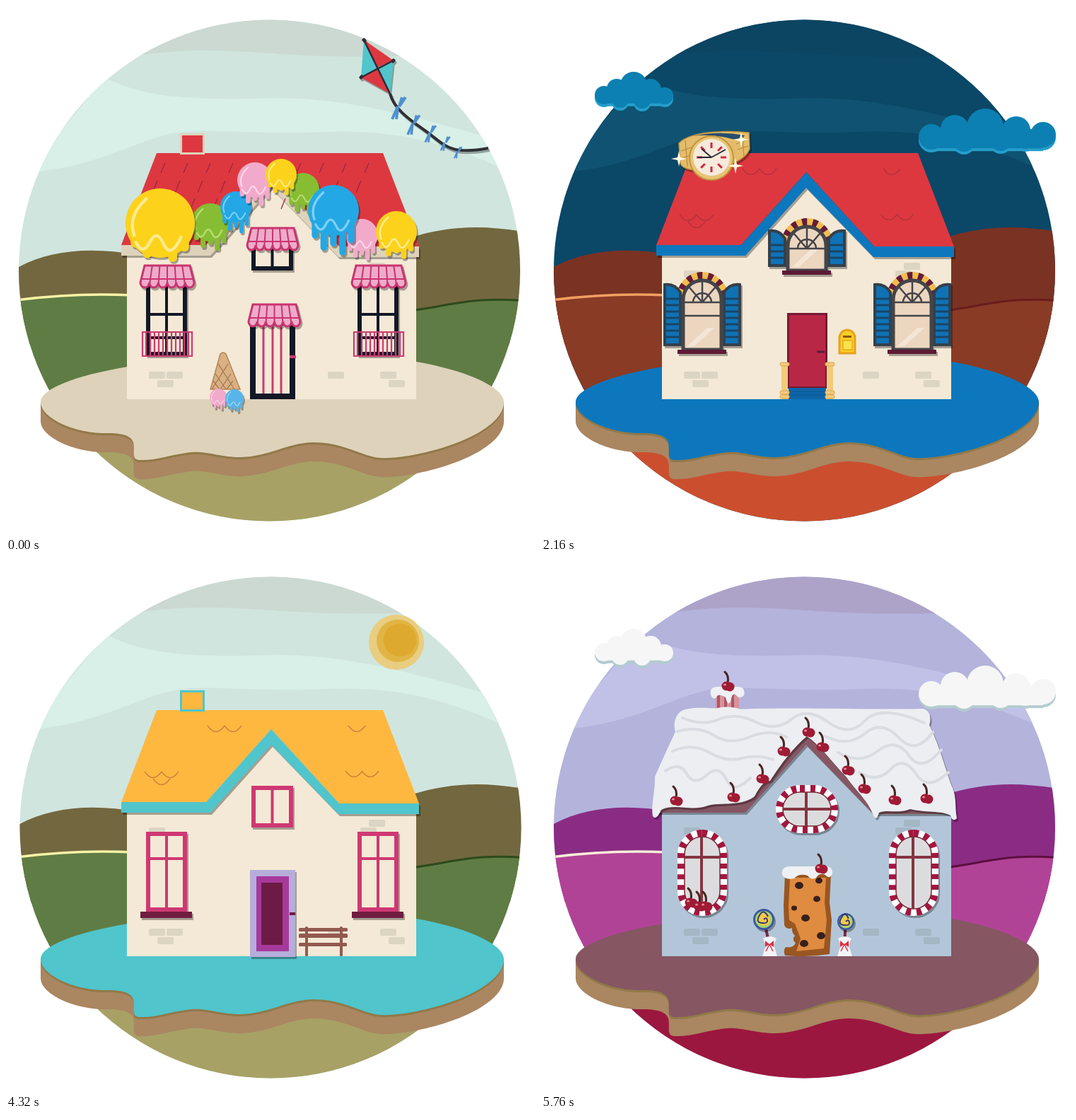
Recreate the animation shown at these times as an HTML page. Size 748 by 748 pixels, loop 6 s.

```html
<!DOCTYPE html>
<html lang="en">
<head>
<meta charset="utf-8">
<title>Little houses</title>
<style>
html,body{margin:0;width:100%;height:100%;overflow:hidden;background:#fff}
svg{display:block;width:100%;height:100%}
.s{filter:drop-shadow(2px 3px 0 rgba(0,0,0,.32))}
</style>
</head>
<body>
<svg id="stage" viewBox="0 0 748 748">
<defs>
<clipPath id="disc"><circle cx="372.5" cy="374" r="354.5"/></clipPath>
<linearGradient id="rainbow" gradientTransform="rotate(9)">
<stop offset=".08" stop-color="#27307f"/><stop offset=".22" stop-color="#1f6fae"/><stop offset=".3" stop-color="#274a98"/><stop offset=".42" stop-color="#1c7a3f"/>
<stop offset=".52" stop-color="#4d9a3a"/><stop offset=".56" stop-color="#f6e52c"/><stop offset=".74" stop-color="#f8c42a"/><stop offset=".87" stop-color="#ee7a2e"/><stop offset="1" stop-color="#d8432f"/>
</linearGradient>
<radialGradient id="gold" cx=".4" cy=".3" r=".75"><stop offset="0" stop-color="#f3cf72"/><stop offset=".5" stop-color="#cf8f25"/><stop offset="1" stop-color="#875010"/></radialGradient>
<radialGradient id="pane" cx=".3" cy=".3" r=".9"><stop offset="0" stop-color="#e6e6e6"/><stop offset="1" stop-color="#bdbdbd"/></radialGradient>
</defs>
</svg>
<script>
const stage = document.getElementById('stage');
const SLOT = 240;

// drawing helpers
const rect = (x, y, w, h, f, a = '') => `<rect x="${x}" y="${y}" width="${w}" height="${h}" fill="${f}" ${a}/>`;
const disc = (x, y, r, f, a = '') => `<circle cx="${x}" cy="${y}" r="${r}" fill="${f}" ${a}/>`;
const oval = (x, y, rx, ry, f, a = '') => `<ellipse cx="${x}" cy="${y}" rx="${rx}" ry="${ry}" fill="${f}" ${a}/>`;
const path = (d, f, a = '') => `<path d="${d}" fill="${f}" ${a}/>`;
const line = (d, c, w = 2, a = '') => path(d, 'none', `stroke="${c}" stroke-width="${w}" ${a}`);
const move = (x, y, s) => `<g transform="translate(${x} ${y})">${s}</g>`;
const shade = s => `<g class="s">${s}</g>`;
const pair = s => s + move(299, 0, s);
const each = (list, f) => list.map(f).join('');
const count = (n, f) => each([...Array(n).keys()], f);
const round = 'stroke-linecap="round"';

const hue = {
  sand: '#ded2ba', cream: '#f4e9d6', red: '#dd3840', teal: '#50c5cc', mist: '#b9c8de', amber: '#feb840',
  blue: '#0d77bd', ink: '#222222', black: '#09090b', stone: '#b8c2c4', lemon: '#fcdc35', cocoa: '#3f1100',
  aqua: '#9bcccd', wine: '#9c1844', mauve: '#865663', ice: '#b3c6d9'
};
// base, top band, light band
const skies = {
  day: ['#d0e5de', '#ccd9d3', '#d8f0e7'], night: ['#0b4767', '#0b4562', '#105271'], grey: ['#9a9a9a', '#9a9a9a', '#9a9a9a'],
  lagoon: ['#4dc3cd', '#48b9c4', '#4dd3da'], rose: ['#e1a8b1', '#d29aa8', '#f2b4c0'], violet: ['#b4b3dc', '#ada3c9', '#c1c1e8']
};
// far hill, near hill, left rim, right rim, front
const lands = {
  moor: ['#73673f', '#5f7c44', '#f8f2a6', '#2d4a1c', '#a7a165'], clay: ['#7a3223', '#8a3b26', '#f0a060', '#6a1d1d', '#cb4f2e'],
  meadow: ['#4a7d5b', '#63a337', '#f8f3b0', '#8a7a35', '#88c442'], dune: ['#f98c47', '#fea168', '#f8f3a8', '#3a0a10', '#e07b48'],
  berry: ['#8a2c84', '#b14397', '#f8f0d8', '#5c0f40', '#9c173f']
};

const city = () => path('M18 245H58Q65 245 65 252V327H93V274Q93 267 100 267H162Q169 267 169 274V300H591V258Q591 251 598 251H665Q672 251 672 258V287H696V228H730V500H18Z', '#6b6b6b') +
  rect(0, 495, 748, 253, '#2a2a2a') + each([[222, 688, 156], [452, 709, 21], [120, 631, 60], [668, 527, 60]], ([x, y, w]) => rect(x, y, w, 6, '#1b1b1b', 'rx="2"'));

const hills = ([far, near, left, right, front]) => {
  const rimL = 'M0 418C60 409 120 406 180 409', rimR = 'M570 431C630 424 660 409 748 418';
  return path('M0 380C45 348 110 338 185 352V480H0ZM570 328C630 309 680 309 748 322V480H570Z', far) +
    path(`${rimL}V600H0Z${rimR}V600H570Z`, near) + line(rimL, left, 3.5) + line(rimR, right, 3) +
    rect(0, 580, 748, 168, front);
};

const backdrop = (sky, land) => {
  const [base, top, light] = skies[sky];
  return '<g clip-path="url(#disc)">' + rect(0, 0, 748, 748, base) +
    path('M180 71C260 57 340 65 390 68S490 73 570 71V0H180Z', top) +
    path('M140 101C200 133 280 133 380 130C490 130 580 158 690 188L710 234C610 185 530 175 450 178C380 182 310 175 260 177C190 181 150 225 30 236Z', light) +
    (land === 'city' ? city() : hills(lands[land])) + '</g>';
};

const shore = 'M49 560C49 542 95 523 172 510C260 490 490 490 580 503C655 516 704 540 704 560C704 592 645 622 575 635C545 640 527 641 510 635C482 625 462 616 432 617C395 619 372 637 332 638C302 638 285 629 262 631C232 634 212 643 190 642C176 642 183 630 180 617C176 605 158 604 140 604C95 604 49 582 49 560Z';
const island = top => move(0, 27, path(shore, '#aa8661')) + rect(49, 560, 655, 27, '#aa8661') +
  move(0, 3, path(shore, '#917948')) + path(shore, top);

const cottage = (wall, roof, trim) =>
  path('M171 350H289L375 255 471 352H580V556H171Z', wall) +
  each([[202, 517], [227, 517], [214, 529], [455, 517], [529, 517], [541, 529], [202, 374], [513, 363], [501, 374]], ([x, y]) => rect(x, y, 23, 10, '#5a6258', 'rx="2" opacity=".15"')) +
  path('M213 208H533L584 340H471L375 235 283 338H163Z', roof) +
  shade(path('M163 338H283L375 235 471 340H584V355H470L375 257 289 353H163Z', trim));

const frame = (x, y, w, h, c, glass, cross, rx = 0) => shade(rect(x + 3, y + 3, w - 6, h - 6, glass, `rx="${rx}"`) +
  (rx ? line(`M${x + 8} ${y + h - 6}V${y + 8}H${x + w - 6}`, '#b9b8ab', 4) : '') +
  line(`M${x + w / 2} ${y + 3}v${h - 6}` + (cross ? `M${x + 3} ${y + cross}h${w - 6}` : ''), c, 4) +
  rect(x + 3, y + 3, w - 6, h - 6, 'none', `rx="${rx}" stroke="${c}" stroke-width="6"`));
const attic = (c, glass) => frame(347, 315, 59, 59, c, glass);
const sashes = (c, sill, glass) => pair(frame(198, 380, 58, 113, c, glass, 38) + shade(rect(190, 493, 73, 9, sill))) + attic(c, glass);

const awning = (x, y, w) => {
  const s = w / 6;
  return shade(path(`M${x} ${y + 25}L${x + 6} ${y + 1}H${x + w - 6}L${x + w} ${y + 25}` + count(6, () => `a${s / 2} 7 0 0 1 ${-s} 0`) + 'Z', '#eeabc9', 'stroke="#c9346f" stroke-width="3"') +
    line(count(5, i => `M${x + s * (i + 1)} ${y + 30}L${x + 6 + (w - 12) * (i + 1) / 6} ${y + 2}`) + `M${x + 2} ${y + 20}H${x + w - 2}`, '#c9346f', 2));
};

const scoop = (x, y, r, [c, light], k = 1) => shade(disc(x, y, r, c) +
  each([[-.72, .9], [-.38, 1.3], [0, 1.15], [.36, 1.45], [.7, 1.05]], ([dx, l]) => line(`M${x + dx * r} ${y + .2 * r}V${y + l * k * r - .1 * r}`, c, .26 * r, round))) +
  line(`M${x - .75 * r} ${y + .35 * r}Q${x - .95 * r} ${y - .2 * r} ${x - .4 * r} ${y - .7 * r}M${x - .7 * r} ${y + .55 * r}q${.2 * r} ${.4 * r} ${.4 * r} .1t${.4 * r} ${.05 * r}t${.5 * r} ${-.2 * r}`, light, .09 * r, round);
const gelato = { y: ['#fcd21b', '#fdeb8c'], g: ['#86bd33', '#b9dc74'], b: ['#23a8e5', '#7fd0f5'], p: ['#f2aacb', '#fbd9e8'] };

const star = (x, y, r = 13) => path('M' + count(10, i => {
  const a = i * Math.PI / 5 - 1.72, q = i % 2 ? r * .45 : r;
  return `${(x + q * Math.cos(a)).toFixed(1)} ${(y + q * Math.sin(a)).toFixed(1)} `;
}) + 'Z', '#fcdc35');
const glint = (x, y) => path(`M${x} ${y - 11}l2 9 9 2-9 2-2 9-2-9-9-2 9-2Z`, '#fffbe0');

const arch = (cx, top, bot) => {
  const cy = top + 28, ring = `M${cx - 32} ${cy}A32 34 0 0 1 ${cx + 32} ${cy}`;
  const shutter = path(`M${cx - 31} ${top + 18}Q${cx - 39} ${top + 5} ${cx - 53} ${top + 7}V${bot - 7}h22Z`, '#0f72b5', 'stroke="#34404b" stroke-width="4"') +
    line(count(Math.floor((bot - top - 34) / 9), i => `M${cx - 51} ${top + 27 + i * 9}h18`), '#174668', 3);
  return shade(line(ring, '#f1bd4d', 10) + line(ring, '#641c3c', 10, 'stroke-dasharray="7 8"') + shutter + `<g transform="translate(${2 * cx}) scale(-1 1)">${shutter}</g>` +
    path(`M${cx - 27} ${bot}V${cy}A27 27 0 0 1 ${cx + 27} ${cy}V${bot}Z`, '#ecd6c0', 'stroke="#444549" stroke-width="5"') +
    path(`M${cx - 21} ${bot - 5}l28-26h10l-28 26Z`, '#f4e6d7') +
    line(`M${cx - 27} ${cy + 4}h54M${cx} ${cy + 4}v-30M${cx} ${cy + 4}l-19-22M${cx} ${cy + 4}l19-22M${cx - 13} ${cy + 4}a13 13 0 0 1 26 0` + (bot - top > 80 ? `M${cx - 27} ${cy + 23}h54` : ''), '#444549', 2.5) +
    rect(cx - 35, bot, 69, 6, '#5d1a36'));
};

const puffs = [
  [[89, 126, 13], [107, 117, 14], [131, 112, 19], [155, 118, 15], [175, 127, 12], [112, 132, 12], [143, 133, 12]],
  [[552, 185, 18], [585, 174, 20], [628, 171, 26], [672, 176, 20], [710, 182, 18], [598, 190, 16], [650, 189, 16], [685, 187, 15]]
];
const clouds = (c, under) => each(puffs, p => {
  const [x1, y1, r1] = p[0], [x2] = p[4];
  const puff = f => each(p, ([x, y, r]) => disc(x, y, r, f)) + rect(x1, y1 - r1 * .6, x2 - x1, r1 * 1.5, f);
  return move(0, 4, puff(under)) + puff(c);
});

const cherry = (x, y) => line(`M${x} ${y - 4}Q${x + 2} ${y - 15} ${x - 4} ${y - 20}`, '#4a2523', 3, round) + disc(x - 2, y, 6.5, '#9f1b35') + disc(x + 3, y + 1, 6.5, '#9f1b35') + oval(x - 4, y - 2, 2, 1.5, '#e58a92');
const candyRim = (x, y, w, h, r) => {
  const b = (f, c, dash = '') => rect(x + 5, y + 5, w - 10, h - 10, f, `rx="${r}" stroke="${c}" stroke-width="10" ${dash}`);
  return shade(b('#dcdcde', '#fff') + b('none', '#a3163f', 'stroke-dasharray="7 8"')) + rect(x + 10, y + 10, w - 20, h - 20, 'none', `rx="${r - 5}" stroke="#7b2635" stroke-width="1.5"`);
};
const lolly = (x, y, r, bag) => line(`M${x} ${y}L${bag} 540`, '#7b2947', 4) + shade(disc(x, y, r, '#3b57a5')) + disc(x, y, r * .8, '#a9d56b') + disc(x, y, r * .58, '#f3c84d') +
  line(`M${x} ${y}q4-4 5 1t-8 4t-3-11t${r * .8} 2`, '#34306b', 1.8) + path(`M${bag - 9} 531q10-6 19 0l-4 9 5 16h-21l5-16Z`, '#f4f4f7') + path(`M${bag} 539l-6-5v9ZM${bag} 539l6-5v9Z`, '#dc2f3e') + line(`M${bag} 539l-5 10m5-10l5 10`, '#dc2f3e', 1.5);
const brush = (x, y, s) => `<g transform="translate(${x} ${y}) scale(${s})">` + count(9, i => {
  const a = (i - 4) * 8, h = 25 + i * 7 % 12;
  return `<g transform="rotate(${a})">` + line(`M0 0V${-h}`, '#4b4b4b', 1.2) + count(4, k => oval(k % 2 ? 3 : -3, 9 - h + k * 6 - 5, 2, 3.5, '#555')) + '</g>';
}) + '</g>';

const parts = {
  stack: (roof, trim) => rect(247.5, 181.5, 32, 27, roof, `stroke="${trim}" stroke-width="3"`),
  tiles: () => line(each([[285, 230], [309, 230], [484, 230], [196, 295], [220, 295], [208, 305], [480, 294], [503, 294]], ([x, y]) => `M${x} ${y}q12 17 24 0`), '#6b2438', 1.5, 'opacity=".35"'),
  ridges: () => line(count(8, i => `M${225 + i * 32 + (i > 3 ? 64 : 0)} 222l-6 14m-5 11l-7 17m-4 8l-6 15`), '#a3243b', 1.3),
  pinkSash: () => sashes('#cf3873', '#701c40', hue.cream),
  rainbowSash: () => sashes('#7d2d88', '#8b3394', 'url(#rainbow)'),
  blinds: () => pair(frame(198, 390, 58, 105, '#131826', hue.cream, 46) + line('M198 469h58', '#131826', 4) + awning(190, 366, 76) +
    line('M193 461h70v34h-70z' + count(11, i => `M${198 + i * 6} 461v34`), '#cc3b70', 2.2)) + frame(347, 333, 59, 41, '#131826', hue.cream) + awning(341, 313, 72),
  stripes: () => rect(349, 448, 56, 104, hue.cream, 'stroke="#131826" stroke-width="8"') + line('M364 452v96M377 452v96M389 452v96', '#c73e72', 3) + rect(401, 494, 9, 4, '#c73e72') + awning(343, 421, 73),
  scoops: () => scoop(289, 306, 27, gelato.g) + scoop(325, 284, 22, gelato.b, 1.15) + scoop(352, 246, 25, gelato.p) + scoop(420, 259, 23, gelato.g, 1.05) + scoop(389, 238, 22, gelato.y, .9) +
    scoop(503, 324, 23, gelato.p, 1.05) + scoop(463, 289, 36, gelato.b, 1.2) + scoop(552, 319, 29, gelato.y, .9) + scoop(218, 307, 49, gelato.y, .75),
  cone: () => path('M303 492q4-4 8 0L331 542H289Z', '#d9b183', 'stroke="#b48558" stroke-width="1.5"') +
    line('M300 506l23 36m-27-22l15 22m-18-12l9 12m12-36l-23 36m27-22l-15 22m18-12l-9 12', '#a87852', 1.3) + scoop(300, 553, 12, gelato.p) + scoop(323, 555, 13, ['#59b4e8', '#a6dbf6']),
  kite: () => shade(path('M506 48L548 77 525 87ZM502 101L543 124 525 87Z', '#dd3840') + path('M506 48L525 87 502 101ZM548 77L543 124 525 87Z', '#50c5cc') +
    line('M506 48L543 124M502 101L548 77', '#302b36', 2.5) + line('M506 48l1 1M548 77l-1 1M502 101l1-1', '#302b36', 5, round) +
    line('M543 124C550 151 583 168 603 184S634 210 682 201', '#2f3035', 4)) +
    each([[556, 142], [577, 166], [601, 179], [622, 193], [640, 206]], ([x, y], i) => { const k = 1 - i * .12; return line(`M${x} ${y}l${9 * k}${-13 * k}M${x} ${y}l${4 * k}${-13 * k}M${x - 2} ${y}l${-8 * k} ${18 * k}M${x - 2} ${y}l${-2 * k} ${18 * k}`, '#4f91cf', 4 * k); }),
  sun: () => disc(552, 112, 39, '#e9cd80') + disc(554, 110, 30, '#e1b545') + disc(557, 109, 23.5, '#ddaa2f'),
  rays: () => disc(552, 112, 30.5, '#fddf2e') + count(8, i => oval(600, 112, 12, 5, '#fddf2e', `transform="rotate(${17 + 45 * i} 552 112)"`)),
  cat: () => path('M499 281l5 7q4-1 8 0l4-8q3 8 3 14q0 8-4 10C532 312 541 325 537 342L506 343q-4-1 2-5q-4-10-2-20q2-8-3-13q-9-4-6-12z', '#1c2126') + line('M530 341C545 349 567 346 560 338C556 333 547 336 543 338', '#1c2126', 5, round),
  birds: () => each(['', 'transform="translate(509) scale(-.6 .75)"'], t => path('M229 474q5-7 11 0q10 7 22 13l-8 1q-4 4-10 2l-2 2q-11-3-12-16z', '#09090b', t)),
  bench: () => each([[414, 516, 69, 5], [414, 524, 69, 6], [414, 537, 68, 5], [423, 514, 4, 42], [472, 514, 4, 42]], ([x, y, w, h]) => rect(x, y, w, h, '#93594f', 'rx="1.5"')),
  plumDoor: () => shade(rect(345, 434, 64, 123, '#b6addb')) + rect(354, 443, 46, 106, '#a63a9c') + rect(361, 452, 30, 88, '#6d1a44') + rect(401, 494, 8, 4, '#6d1a44'),
  greenDoor: () => shade(rect(345, 434, 64, 123, '#0aa557')) + rect(354, 443, 46, 106, '#a9523b', 'stroke="#76452c" stroke-width="1.5"') + rect(401, 494, 8, 4, '#dd3840'),
  arches: () => arch(228, 387, 486) + arch(525, 387, 486) + arch(376, 311, 374),
  porch: () => rect(349.5, 435.5, 54, 104, '#b92746', 'stroke="#761b32" stroke-width="3"') + line('M390 489h11', '#53233a', 3) + rect(350, 540, 53, 16, '#0e65a8') + line('M350 545h53M350 550h53', '#0b568f', 1) +
    each([339, 403], x => rect(x + 1, 505, 9, 51, '#f2cb7b') + each([504, 544, 550], y => rect(x - 1, y, 13, 5, '#f2cb7b', 'rx="2" stroke="#d8a552"'))),
  mailbox: () => path('M422 491V469A11 11 0 0 1 444 469V491Z', '#fbce25', 'stroke="#e8a21e" stroke-width="3"') + rect(427, 466, 12, 3, '#8a5a14') + rect(427, 473, 13, 13, '#fde14a', 'stroke="#d4971c"'),
  watch: () => shade(path('M195 194C215 174 275 177 294 179L295 202C285 231 202 242 197 222Z', '#e4bd6c', 'stroke="#c49540" stroke-width="1.5"')) + path('M214 184Q250 176 288 183Q283 191 270 188Q240 180 214 184Z', '#294c6d') +
    line('M198 205l20-7M198 215l18-5M204 190l3 37M276 195l16-6M278 203l15-5M285 186l2 27', '#b98c3b', 1.2) + disc(241, 215, 31, '#e8c576', 'stroke="#c49540" stroke-width="2"') + disc(241, 214, 26, '#f5eadb') +
    count(8, i => line('M241 193v8', '#d6293c', 3, `transform="rotate(${45 * i} 241 214)"`)) + line('M241 214L261 203M241 214L227 202M241 214H222', '#252a33', 1.8) + glint(195, 216) + glint(283, 189) + glint(275, 226),
  clouds: () => clouds('#f6f6f7', '#b3cbcf'),
  darkClouds: () => clouds('#0c80b2', '#249ecb'),
  gloom: () => path('M171 350L375 255 580 352V556H171Z', '#262626') +
    line(count(13, r => `M171 ${280 + r * 23}H580` + count(6, i => `M${180 + i * 72 + r % 2 * 38} ${280 + r * 23}v23`)), '#1b1b1b', 4, 'clip-path="polygon(171px 350px,375px 255px,580px 350px,580px 556px,171px 556px)"') +
    rect(241, 163, 31, 50, '#09090b', 'rx="2"') + path('M212 207H543L620 358Q623 365 615 364L582 354 571 372 555 358 541 370 526 354 513 368 497 350 480 369 464 342 452 350 447 330 433 336 430 315 414 321 412 295 393 292 386 267 380 280 376 266 370 280 363 275 358 292 338 290 341 315 320 318 317 337 301 337 290 362 270 348 257 371 241 352 226 367 211 352 202 370 184 354 138 364Q130 365 133 358Z', '#09090b') +
    pair(rect(198, 380, 58, 112, '#0c0c0d', 'rx="3"') + count(6, i => rect(204 + i % 2 * 26, 385 + (i >> 1) * 36, 20, i < 2 ? 27 : 31, 'url(#pane)'))) +
    rect(347, 315, 59, 58, '#0c0c0d', 'rx="3"') + count(4, i => rect(352 + i % 2 * 27, 320 + (i >> 1) * 27, 21, 21, 'url(#pane)')) +
    rect(345, 433, 66, 123, '#0c0b0c') + line('M397 496h13', '#56565a', 3) +
    each([319, 440], x => brush(x, 524, 1) + path(`M${x - 16} 522h32q2 6-4 9q8 13-4 27l3 7h-23l3-7q-12-14-4-27q-5-3-3-9Z`, '#0d0d0e')),
  hat: () => path('M533 207Q560 215 553 253L545 238Z', '#303942') + path('M160 340Q193 262 211 207C225 167 234 135 233 106L226 98 222 104 214 97 210 101 205 91C209 112 190 136 158 137C152 131 165 122 166 113C168 103 165 86 174 71C189 33 218 45 240 45C267 42 285 36 305 40C332 54 328 83 341 113C357 155 390 190 428 208L330 300Z', '#173a80') +
    each([[205, 61], [298, 54], [255, 85], [181, 110], [268, 124], [322, 113], [248, 174], [332, 165], [283, 198], [371, 184], [356, 220], [223, 239], [297, 267], [222, 299], [409, 216], [354, 262]], ([x, y]) => star(x, y)) +
    line('M233 108C270 100 310 108 345 123M182 283C250 260 340 215 392 183M180 297C260 275 350 225 399 193M178 299C230 290 280 285 330 280', '#e3a03e', 3) +
    shade(path('M24 326C70 318 170 327 240 314C330 295 395 230 425 207C468 177 535 162 562 188C577 207 572 244 556 253C557 226 546 208 520 207C470 204 425 224 385 262C330 318 275 362 200 368C125 368 55 352 24 335Q20 330 24 326Z', '#031d69')),
  witch: () => shade(line('M451 92L580 99', '#9a5b30', 4, round) + path('M577 98Q590 88 625 89L617 95 626 98 615 101 622 109Q590 108 577 98Z', '#f2a63d') +
    oval(487, 55, 8, 8, '#7d7f45') + path('M466 45Q480 39 482 37Q484 25 492 19Q498 20 494 27L500 42 515 45Q490 51 466 45Z', '#172128') +
    line('M484 67L469 88 460 92', '#ad1c43', 7) + path('M482 60Q498 64 503 82Q525 92 533 107Q540 119 553 120Q528 126 510 120L476 114Q485 104 482 93Z', '#ad1c43') + path('M475 102q10 2 14 8l-9 2Z', '#d87084') +
    line('M503 116l2 16m5-16l-2 16m5-17l3 13', '#172128', 3)),
  roundSash: () => pair(frame(198, 380, 58, 113, '#f4df3e', hue.cream, 38, 9)),
  eye: () => shade(rect(341, 309, 70, 72, hue.cream, 'rx="8"') + line('M346 378V314H408', '#b9b8ab', 4) + rect(341, 309, 70, 72, 'none', 'rx="8" stroke="#f4df3e" stroke-width="6"')) +
    line('M346 329Q374 314 407 329M346 339Q375 320 407 341M346 339Q372 349 398 340M395 344C385 357 376 370 362 369C349 367 349 354 358 354C364 355 362 362 358 361', '#121318', 3) + path('M387 347Q392 357 392 370Q393 357 401 349Q393 352 387 347Z', '#121318') + disc(380, 335, 7, '#121318'),
  oakDoor: () => path('M346 555V480C346 452 362 435 378 435S410 452 410 480V555Z', '#805c34', 'stroke="#4e391f" stroke-width="2.5"') + line('M356 452v103m10-115v115m10-120v120m10-117v117m11-107v107', '#513a20', 1.7) + disc(398, 509, 4.5, '#46331e'),
  egg: () => path('M317 519C327 519 331 534 331 542C331 551 325 556 317 556S303 551 303 542C303 534 307 519 317 519Z', 'url(#gold)'),
  board: () => each([[311, 494], [329, 494], [311, 546], [329, 546]], ([x, y]) => oval(x, y, 5, 4, '#52653f')) + path('M320 480Q327 482 331 492Q328 520 332 550Q328 557 320 557T309 550Q313 520 309 492Q314 482 320 480Z', '#df536d') + each([[316, 493], [324, 493], [316, 545], [324, 545]], ([x, y]) => disc(x, y, 1.3, '#7c2036')),
  snow: () => rect(247, 184, 33, 24, '#d9929b') + line('M251 184v24m10-24v24m10-24v24', '#a75768', 4) + path('M240 186Q238 175 250 175H276Q290 174 287 187Q281 194 275 186Q270 183 268 196Q264 203 261 190Q250 183 247 191Q242 193 240 186ZM246 206Q263 201 281 206Q277 215 263 211Q250 215 246 206Z', '#eff1f4') +
    shade(path('M204 207C225 201 260 209 300 206C380 204 480 208 540 206C551 209 552 220 549 229C565 261 574 300 582 318C588 333 585 345 588 361Q582 367 579 357C568 350 541 353 522 348C504 355 490 348 478 353Q474 366 470 357C462 335 444 321 432 303C410 280 396 259 376 245C352 265 334 293 324 308C315 309 310 315 302 330C283 345 253 338 236 343C211 352 190 339 170 349Q163 365 158 358C155 342 162 322 161 302C171 280 182 255 190 239C186 226 191 210 204 207Z', '#eceef1')) +
    line('M200 219q28 12 52 2t52 4t50-4t52 4t52-2t84 3M193 238q30-8 52 6t50 2t52 0M186 266q28-12 52 2t46 8t44 2M176 294q20-14 30 4t28 2t28 6t34-2M402 245q32 16 56-4t48 6t48-8M420 268q30 18 56-2t44 6t46-8M450 296q25 16 44-4t36 6t46-2', '#d9dce1', 4, round) +
    each([[191, 336], [272, 331], [313, 305], [343, 266], [378, 239], [398, 260], [434, 293], [457, 319], [500, 335], [545, 333], [264, 174]], ([x, y]) => cherry(x, y)),
  candy: () => pair(candyRim(193, 377, 70, 122, 30) + line('M227 387v102M203 416h50', '#843541', 4)) + candyRim(332, 314, 88, 68, 29) + line('M375 324v48M342 348h68', '#843541', 4) + each([[212, 480], [224, 485], [233, 485]], ([x, y]) => cherry(x, y)),
  cookie: () => path('M345 440H410L408 480 411 505 408 553Q375 558 345 555Q342 548 346 543Q357 545 360 537Q354 533 359 527Q354 522 355 516Q347 519 344 512L343 485Z', '#995621') + path('M352 445H403L401 480 404 505 400 545 361 549 367 531 359 510 351 505 350 485Z', '#df8b40') +
    each([[365, 456, 6], [393, 449, 5], [390, 475, 5], [358, 488, 4], [374, 502, 6], [396, 527, 6], [372, 538, 6]], ([x, y, r]) => oval(x, y, r, r * .85, '#38201c')) +
    path('M341 441Q339 428 355 429H398Q413 427 412 440Q407 448 402 441Q394 437 389 445Q382 449 377 442Q365 438 358 446Q346 449 341 441Z', '#eef0f3') + cherry(396, 432),
  lollies: () => lolly(315, 504, 15, 323) + lolly(431, 507, 12, 429)
};

// sky, land, ground, wall, roof, trim, then parts; "+" nudges the backdrop
const slots = `day moor sand cream red sand ridges stack blinds stripes scoops cone kite
day meadow teal cream wine aqua tiles stack pinkSash plumDoor bench
rose dune sand mist red teal tiles stack rainbowSash greenDoor board
day moor aqua cream red blue + tiles stack pinkSash porch mailbox
day moor teal mist amber teal + tiles stack sun pinkSash plumDoor cat birds bench
lagoon meadow sand cream red sand tiles stack roundSash eye oakDoor egg
violet berry mauve ice wine mauve clouds tiles stack candy cookie lollies
rose clay blue cream red blue tiles arches porch mailbox
lagoon dune cocoa cream amber teal tiles stack pinkSash greenDoor bench
night clay blue cream red blue darkClouds tiles arches porch mailbox watch
night clay cocoa stone wine cocoa witch tiles stack roundSash eye oakDoor
violet moor aqua cream red aqua tiles stack pinkSash plumDoor birds
grey city ink ink black black gloom
rose dune aqua cream wine aqua rays tiles stack rainbowSash greenDoor
day berry sand cream red sand ridges stack blinds stripes cone
lagoon meadow teal mist amber teal tiles stack pinkSash plumDoor cat
lagoon meadow cocoa stone lemon cocoa witch roundSash eye oakDoor egg hat
night clay blue cream red blue tiles stack arches porch
day moor teal cream amber teal + sun tiles stack pinkSash plumDoor bench
violet berry sand mist red sand + tiles stack blinds stripes
rose dune aqua cream wine aqua + rays tiles stack rainbowSash greenDoor board birds
lagoon meadow sand cream red blue tiles stack arches porch mailbox
day meadow aqua mist amber teal tiles stack pinkSash plumDoor
violet dune sand cream wine aqua tiles stack rainbowSash greenDoor
violet berry mauve ice wine mauve clouds snow candy cookie lollies`.split('\n');

const scene = spec => {
  const [sky, land, ...rest] = spec.split(' ');
  const [ground, wall, roof, trim] = rest.map(k => hue[k]);
  const extras = rest.slice(4).filter(k => k !== '+');
  return move(rest.includes('+') ? 1.5 : 0, 0, backdrop(sky, land)) + island(ground) + cottage(wall, roof, trim) +
    each(extras, k => parts[k](roof, trim));
};

stage.insertAdjacentHTML('beforeend', each(slots, s => `<g class="scene" display="none">${scene(s)}</g>`));
const scenes = [...stage.querySelectorAll('.scene')];
const start = performance.now();
let shown = -1;

function draw() {
  const now = Math.floor((performance.now() - start) / SLOT) % scenes.length;
  if (now !== shown) {
    scenes.forEach((g, i) => g.setAttribute('display', i === now ? 'inline' : 'none'));
    shown = now;
  }
  requestAnimationFrame(draw);
}
draw();
</script>
</body>
</html>
```
